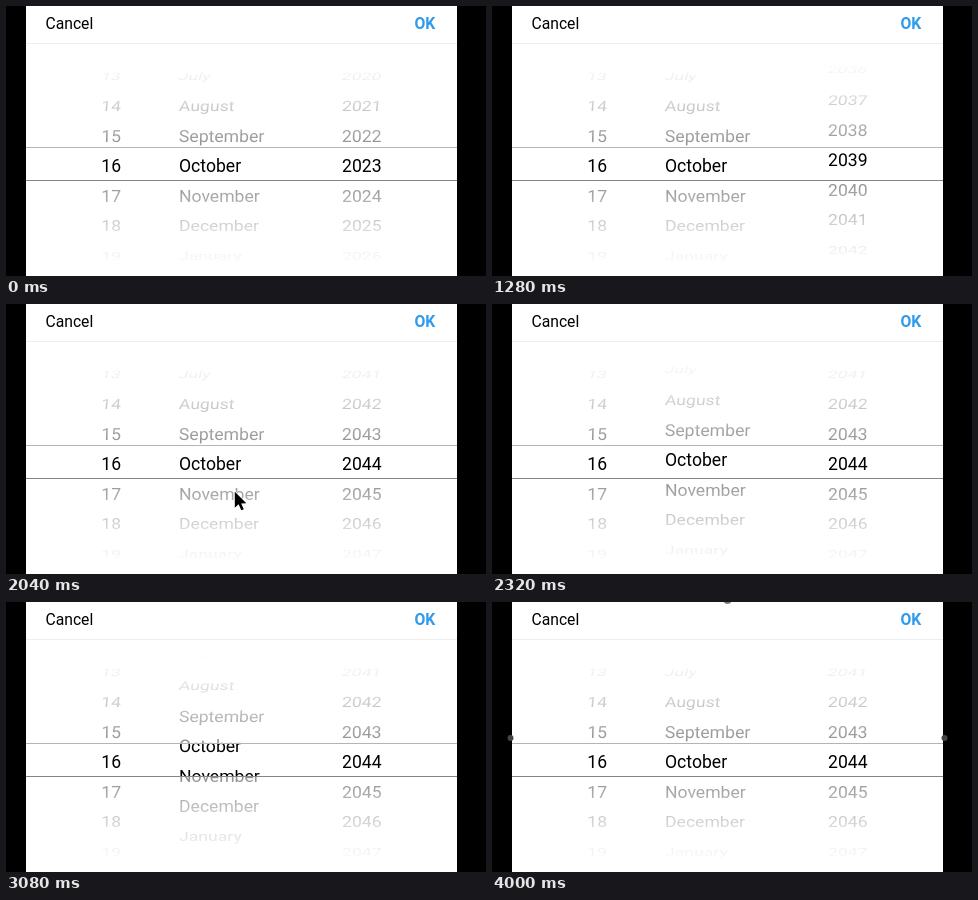
Recreate the animation shown at these times as an HTML page with a canvas. Size 480 by 270 pixels, loop 4.12 s.

```html
<!DOCTYPE html>
<html lang="en">
<head>
<meta charset="utf-8">
<title>Date picker</title>
<style>
html, body { margin: 0; width: 100%; height: 100%; overflow: hidden; background: #000; }
canvas { display: block; width: 480px; height: 270px; }
</style>
</head>
<body>
<canvas id="stage" width="480" height="270"></canvas>
<script>
const ctx = document.getElementById('stage').getContext('2d');
const LOOP = 4120, STEP = 40;
const LEFT = 20, WIDTH = 431, HEAD = 38, MID = 160, ROW = 30;
const TILT = Math.PI / 10, FADE = 91;
const FONT = 'Roboto, "Open Sans", sans-serif';
const MONTHS = ['January', 'February', 'March', 'April', 'May', 'June', 'July',
  'August', 'September', 'October', 'November', 'December'];

const clamp = v => Math.max(0, Math.min(1, v));
const ease = v => v * v * (3 - 2 * v);
const mix = (a, b, k) => a + (b - a) * k;
const span = (t, a, b) => ease(clamp((t - a) / (b - a)));

// Rows travelled: quick pull, exponential glide, then a snap to a whole row.
function flick(t, start, reach, rest, snapAt, snapEnd) {
  const glide = u => reach * (1 - Math.exp((start - u) / 247));
  const free = start + 40;
  if (t < free) return glide(free) * clamp((t - start + 70) / 110) ** 2;
  if (t < snapAt) return glide(t);
  return mix(glide(snapAt), rest, span(t, snapAt, snapEnd));
}

function wheel(x, pos, label) {
  const base = Math.round(pos);
  for (let i = base - 4; i <= base + 4; i++) {
    const d = i - pos, squash = Math.cos(d * TILT);
    const skew = d < 0 ? 0.02 * d * d : 0;
    ctx.save();
    ctx.transform(1, 0, -skew, squash, x, MID + d * ROW);
    ctx.fillText(label(i), 0, 6.3);
    ctx.restore();
  }
}

// Whitens rows of pixels more and more from y in the given direction.
function veil(y, dir) {
  for (let d = 0; d < 104; d++) {
    const ink = 0.44 * clamp(1 - d / FADE) ** 1.4;
    box(y + dir * d, 1, `rgba(255,255,255,${1 - ink})`);
  }
}

function box(y, height, color) {
  ctx.fillStyle = color;
  ctx.fillRect(LEFT, y, WIDTH, height);
}

function text(str, x, y, style, color) {
  ctx.font = `${style} ${FONT}`;
  ctx.fillStyle = color;
  ctx.fillText(str, x, y);
}

function dot(x, y, r, color) {
  ctx.fillStyle = color;
  ctx.beginPath();
  ctx.arc(x, y, r, 0, 7);
  ctx.fill();
}

// Each visit glides in, rests, then swipes upwards and vanishes.
const visits = [
  { enter: 320, arrive: 840, pull: 880, from: [390, 46], rest: [352, 197], to: [360, 22] },
  { enter: 1560, arrive: 1680, pull: 2080, from: [300, 160], rest: [228, 187], to: [236, -22] }
];

function pointer(t) {
  const v = visits.find(v => t >= v.enter && t < v.pull + 120);
  if (!v) return;
  const [x, y] = v.rest.map((p, i) =>
    mix(mix(v.from[i], p, span(t, v.enter, v.arrive)), v.to[i], span(t, v.pull, v.pull + 120)));
  ctx.save();
  ctx.translate(x + 0.8, y + 0.8);
  const arrow = new Path2D('M0 0V16L3.8 12.5 6.5 18.5 9 17.4 6.4 11.6 11.5 11.4Z');
  ctx.lineWidth = 1.5;
  ctx.strokeStyle = '#fff';
  ctx.stroke(arrow);
  ctx.fillStyle = '#000';
  ctx.fill(arrow);
  ctx.restore();
}

function draw(t) {
  ctx.fillStyle = '#000';
  ctx.fillRect(0, 0, 480, 270);
  box(0, 270, '#fff');

  ctx.fillStyle = '#000';
  ctx.font = '17.6px ' + FONT;
  wheel(95.3, 16, String);
  wheel(173, 9 + flick(t, 2157, 25.13, 24, 3080, 3280), i => MONTHS[i % 12]);
  wheel(336, 2023 + flick(t, 949, 21.95, 21, 1840, 1960), String);

  veil(140, -1);
  veil(175, 1);
  box(0, HEAD, '#fff');
  box(141, 1, '#b4b4b4');
  box(174, 1, '#858585');
  box(37, 1, '#eee');

  text('Cancel', 39.5, 23, '15.7px', '#000');
  text('OK', 408.5, 23, 'bold 15.7px', '#2f9bea');

  if (t >= 3760) {
    dot(235.5, -2, 4, '#777');
    dot(18.5, 136, 3, '#444');
    dot(452.5, 136, 3, '#444');
  }
  pointer(t);
}

const t0 = performance.now();
function tick() {
  const t = (performance.now() - t0) % LOOP;
  draw(Math.floor(t / STEP) * STEP);
  requestAnimationFrame(tick);
}
tick();
</script>
</body>
</html>
```
